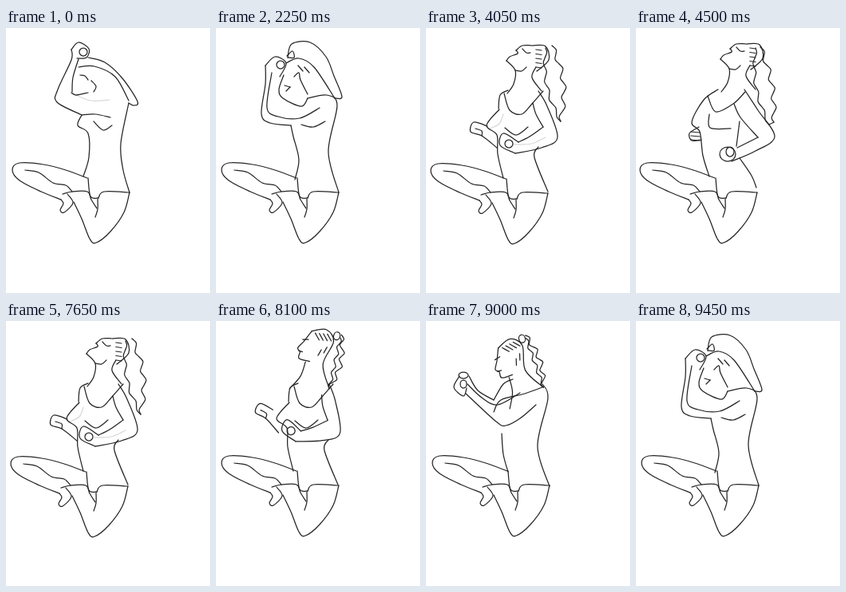
Write an HTML page with a canvas that moves like this. It is 256x332 px and loops after 9900 ms.

```html
<!DOCTYPE html>
<html lang="en">
<head>
<meta charset="utf-8">
<title>Seated stretch</title>
<style>
html, body { margin: 0; width: 100%; height: 100%; overflow: hidden; background: #fff; }
canvas { display: block; width: 100%; height: 100%; }
</style>
</head>
<body>
<canvas id="stage"></canvas>
<script>
const W = 256, H = 332, INK = '#242424', SOFT = '#d8d8d8';
const canvas = document.getElementById('stage');
const ctx = canvas.getContext('2d');
const scale = window.devicePixelRatio || 1;
canvas.width = W * scale;
canvas.height = H * scale;

// Smooth stroke through x, y pairs.
function line(...n) {
  const last = n.length / 2 - 1;
  const at = i => { const k = 2 * Math.max(0, Math.min(last, i)); return [n[k], n[k + 1]]; };
  ctx.beginPath();
  ctx.moveTo(n[0], n[1]);
  for (let i = 0; i < last; i++) {
    const a = at(i - 1), b = at(i), c = at(i + 1), d = at(i + 2);
    ctx.bezierCurveTo(b[0] + (c[0] - a[0]) / 6, b[1] + (c[1] - a[1]) / 6,
      c[0] - (d[0] - b[0]) / 6, c[1] - (d[1] - b[1]) / 6, c[0], c[1]);
  }
  ctx.stroke();
}

function ring(x, y, rx, ry = rx) {
  ctx.beginPath();
  ctx.ellipse(x, y, rx, ry, 0, 0, 7);
  ctx.stroke();
}

// Wavy lock of hair, bowed sideways.
function lock(x0, y0, x1, y1, bow, ripple) {
  const dx = x1 - x0, dy = y1 - y0, len = Math.hypot(dx, dy), pts = [];
  for (let i = 0; i <= 16; i++) {
    const t = i / 16;
    const off = Math.sin(Math.PI * t) * bow + Math.sin(8 * Math.PI * t) * ripple;
    pts.push(x0 + dx * t + dy / len * off, y0 + dy * t - dx / len * off);
  }
  line(...pts);
}

// Row of short strokes (sx, sy), one step (dx, dy) apart.
function hatch(count, x, y, dx, dy, sx, sy) {
  for (let i = 0; i < count; i++) {
    const px = x + dx * i, py = y + dy * i;
    line(px, py, px + sx, py + sy);
  }
}

function place(x, y, draw, turn = 0, px = 0, py = 0) {
  ctx.save();
  ctx.translate(x + px, y + py);
  ctx.rotate(turn * Math.PI / 180);
  ctx.translate(-px, -py);
  draw();
  ctx.restore();
}

function legs() {
  line(103, 187, 76, 177, 48, 170, 18, 168, 9, 177, 18, 190, 45, 204, 70, 214);
  line(70, 214, 73, 219, 69, 227, 74, 230, 85, 218, 78, 207);
  line(25, 177, 42, 180, 60, 193, 76, 196, 84, 204);
  line(72, 207, 84, 204, 103, 204, 108, 214, 115, 225);
  line(86, 217, 96, 238, 106, 263, 114, 268, 132, 254, 149, 230, 156, 205);
  line(104, 187, 107, 210, 117, 212);
  line(117, 212, 124, 204, 156, 205);
  line(116, 213, 116, 226, 113, 236);
}

function folded() {
  ctx.strokeStyle = SOFT;
  line(84, 82, 106, 91, 130, 90);
  ctx.strokeStyle = INK;
  line(82, 27, 82, 40, 65, 77, 64, 93, 95, 109);
  line(91, 39, 84, 62, 83, 80);
  line(82, 81, 88, 84, 103, 81);
  line(82, 27, 91, 18, 104, 26, 101, 37, 89, 38);
  ring(97, 30, 5);
  line(103, 37, 124, 43, 146, 63, 165, 92, 160, 97, 154, 94);
  line(91, 49, 111, 48, 137, 61, 154, 91);
  line(93, 59, 99, 60, 103, 65);
  line(107, 66, 113, 73, 110, 80);
  line(95, 109, 90, 122, 103, 132, 104, 162, 97, 186);
  line(95, 109, 112, 108, 131, 112);
  line(110, 117, 122, 128, 133, 122);
  line(154, 94, 144, 145, 147, 178, 155, 206);
}

function bowed() {
  line(62, 47, 62, 70, 57, 108, 68, 119, 94, 122);
  line(70, 56, 64, 100, 78, 111, 105, 113, 130, 100);
  line(62, 47, 74, 36, 88, 44, 80, 61);
  ring(81, 46, 5);
  line(90, 37, 95, 20, 118, 18, 138, 36, 148, 60, 158, 86, 149, 88);
  line(88, 44, 104, 38, 123, 49, 149, 88);
  line(89, 35, 96, 29, 98, 37, 90, 37);
  line(85, 59, 79, 77, 84, 88, 107, 98, 115, 88);
  hatch(1, 86, 72, 0, 0, 7, 2);
  hatch(1, 93, 74, 0, 0, -5, 5);
  line(98, 61, 104, 56, 106, 65, 115, 83);
  hatch(2, 103, 47, 8, 2, 6, 7);
  line(115, 88, 139, 84, 152, 97, 141, 155, 154, 206);
  line(94, 122, 97, 136, 104, 165, 99, 190);
  line(107, 121, 122, 124, 137, 117);
}

function uprightHead() {
  line(106, 14, 100, 29, 95, 39, 99, 43, 100, 51, 114, 51);
  line(106, 14, 123, 7, 136, 19, 131, 50, 147, 77);
  line(109, 53, 108, 72, 99, 91);
  line(98, 27, 105, 25);
  line(97, 42, 102, 42);
  hatch(4, 111, 15, 5, -1, 7, 7);
  hatch(2, 130, 28, -6, 5, -2, 8);
  ring(138, 11, 4, 5);
  lock(143, 8, 147, 77, 7, 3);
  lock(143, 12, 147, 77, 0, 2);
}

function forwardArms() {
  line(50, 77, 61, 95, 81, 107);
  line(81, 107, 93, 87, 105, 81);
  line(46, 99, 84, 134, 96, 139, 114, 130, 134, 113);
  line(48, 87, 66, 104, 86, 113, 114, 98);
  line(38, 77, 31, 91, 43, 102, 47, 92);
  ring(43, 76, 6, 4);
  ring(43, 87, 4, 5);
}

function uprightTorso() {
  line(147, 77, 154, 95, 141, 155, 156, 205);
  line(96, 139, 98, 165, 104, 187);
  line(86, 112, 95, 97, 125, 89, 147, 81);
}

function tippedHead() {
  line(101, 41, 105, 36, 115, 32, 113, 28);
  line(113, 28, 121, 22, 133, 22, 150, 23, 154, 40, 139, 54);
  line(101, 41, 112, 53, 110, 70, 102, 82);
  line(138, 49, 133, 62, 145, 79);
  line(112, 53, 120, 54, 126, 49);
  line(121, 26, 126, 31, 131, 31);
  hatch(5, 138, 27, 0, 5.5, 7, 1);
}

function tippedTorso() {
  line(98, 82, 105, 103, 120, 108, 133, 95, 147, 79);
  line(103, 78, 93, 84, 91, 101);
  line(92, 102, 76, 122, 89, 134, 90, 158, 97, 188);
  line(99, 125, 113, 134, 128, 124);
  line(141, 149, 136, 162, 153, 205);
}

function apartArms() {
  line(141, 79, 152, 98, 165, 137, 145, 150, 112, 157);
  line(134, 94, 138, 108, 147, 124);
  line(147, 124, 130, 136, 116, 143);
  line(116, 143, 97, 132, 93, 147, 112, 157);
  ring(104, 145, 5);
  line(89, 150, 70, 135, 56, 130, 60, 118, 77, 123);
  line(62, 126, 70, 129, 70, 135);
}

function tipped() {
  ctx.strokeStyle = SOFT;
  line(80, 126, 92, 120, 97, 108);
  line(110, 146, 132, 145, 150, 137);
  ctx.strokeStyle = INK;
  tippedHead();
  lock(150, 25, 169, 117, -8, 2);
  lock(158, 22, 169, 117, 9, 3);
  tippedTorso();
  apartArms();
}

function opened() {
  place(5, -2, tippedHead);
  lock(150, 25, 167, 121, -8, 2);
  lock(156, 24, 173, 118, 6, 3);
  line(173, 118, 167, 121);
  line(103, 77, 85, 90, 70, 118, 80, 130, 84, 160, 92, 186);
  line(90, 85, 100, 105, 122, 95, 137, 80);
  line(92, 108, 93, 125, 119, 126);
  line(130, 117, 126, 148);
  line(130, 163, 145, 185, 151, 200);
  line(136, 77, 153, 103, 174, 136, 150, 154, 120, 167);
  line(123, 95, 131, 112, 153, 137);
  line(153, 137, 127, 150);
  ring(115, 158, 10, 9);
  ring(118, 155, 5, 6);
  line(79, 124, 67, 132, 70, 141, 82, 140);
  hatch(3, 69, 130, 0, 5, 11, 1);
}

function lowering() {
  place(-3, 12, uprightHead, -16, 128, 62);
  place(4, -8, forwardArms);
  place(-1, 2, uprightTorso);
}

function upright() {
  uprightHead();
  forwardArms();
  uprightTorso();
}

function lifting() {
  place(0, 3, uprightHead, 16, 128, 62);
  tippedTorso();
  place(0, 0, apartArms, 10, 141, 85);
}

// Upper body with the shift of the legs.
const poses = [[folded, -1, 1], [bowed, -2, 1], [lowering, -1, 1], [upright, 0, 0],
  [lifting, -2, 1], [tipped, -3, 2], [opened, -4, 1]];

// Poses run forward and back; the two end poses are held.
const BEAT = 450, HOLD = [2250, 3150], TOP = poses.length - 1;
const RISE = HOLD[0] + BEAT * (TOP - 1);
const FALL = RISE + HOLD[1];
const LOOP = FALL + BEAT * (TOP - 1);

function poseAt(t) {
  if (t < HOLD[0]) return 0;
  if (t < RISE) return 1 + Math.floor((t - HOLD[0]) / BEAT);
  if (t < FALL) return TOP;
  return TOP - 1 - Math.floor((t - FALL) / BEAT);
}

const start = performance.now();
function tick() {
  const [body, x, y] = poses[poseAt((performance.now() - start) % LOOP)];
  ctx.setTransform(scale, 0, 0, scale, 0, 0);
  ctx.fillStyle = '#fff';
  ctx.fillRect(0, 0, W, H);
  ctx.strokeStyle = INK;
  ctx.lineWidth = 1.25;
  ctx.lineCap = ctx.lineJoin = 'round';
  body();
  place(x, y, legs);
  requestAnimationFrame(tick);
}
tick();
</script>
</body>
</html>
```
